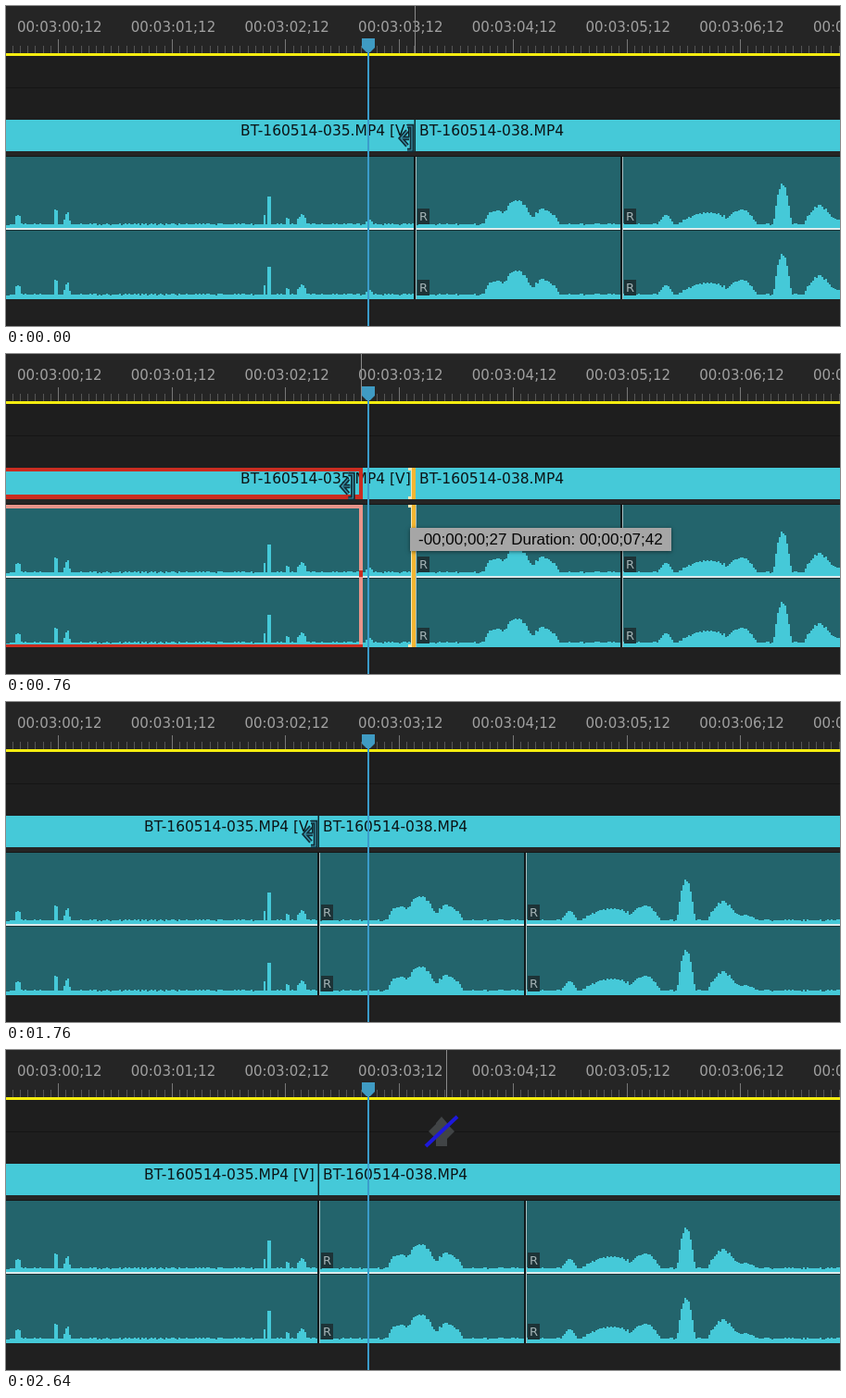
Write an HTML page with a canvas that moves like this. It is 900x346 px and loops after 2.68 s.

```html
<!DOCTYPE html>
<html lang="en">
<head>
<meta charset="utf-8">
<title>Trimming a clip on a timeline</title>
<style>
  html, body { margin: 0; width: 100%; height: 100%; overflow: hidden; background: #222; }
  canvas { display: block; width: 900px; height: 346px; }
</style>
</head>
<body>
<canvas id="stage" width="900" height="346"></canvas>
<script>
const ctx = document.getElementById('stage').getContext('2d');
const LOOP = 2680, STEP = 40, PRESS = 240, RELEASE = 1600, LEAVE = 1800;
const CUT = 441, CUT_END = 337, CLIP_LENGTH = 223;
const FRAME_WIDTH = 2.04, FULL_DURATION = 489;
const CYAN = '#45c9d8', TEAL = '#23646c', RED = '#cb2c20', SALMON = '#e8948a';
const YELLOW = '#f2b632', PALE = '#f7e6b4', GREY = '#484b4d';
const UI_FONT = '"DejaVu Sans", sans-serif';

// [time, position] of the pointer
const pointerX = [[300, 441], [440, 430], [475, 423], [520, 415], [960, 346], [1080, 337],
  [LEAVE, 337], [2040, 413], [2120, 429], [2440, 492], [2640, 470]];
const pointerY = [[LEAVE, 143], [2120, 144], [2440, 95], [2640, 88]];

// [centre, half width, height] of the sounds in each clip
const sounds = [
  [[12, 3, 14], [53, 2, 20], [65, 3, 16], [278, 1, 13], [283, 1, 44], [303, 2, 10], [318, 6, 13], [391, 4, 9]],
  [[87, 14, 18], [109, 19, 28], [139, 17, 19]],
  [[47, 9, 12], [92, 34, 15], [128, 18, 19], [173, 9, 46], [213, 17, 22], [232, 22, 9]]
];

function track(keys, x) {
  if (x <= keys[0][0]) return keys[0][1];
  for (let i = 1; i < keys.length; i++) {
    const [a, from] = keys[i - 1], [b, to] = keys[i];
    if (x <= b) return from + (to - from) * (x - a) / (b - a);
  }
  return keys[keys.length - 1][1];
}

function noise(n) {
  const v = Math.sin(n * 12.9898) * 43758.5453;
  return v - Math.floor(v);
}

function box(color, x, y, w, h) {
  ctx.fillStyle = color;
  ctx.fillRect(x, y, w, h);
}

function label(text, x, y, color, font) {
  ctx.fillStyle = color;
  ctx.font = font;
  ctx.fillText(text, x, y);
}

function stroke(path, color, width) {
  ctx.strokeStyle = color;
  ctx.lineWidth = width;
  ctx.stroke(new Path2D(path));
}

function fill(path, color) {
  ctx.fillStyle = color;
  ctx.fill(new Path2D(path));
}

function drawRuler(lineX) {
  box('#252525', 0, 0, 900, 51);
  const period = 122.7;
  for (let i = -15; i < 120; i++) {
    const major = i % 15 === 0;
    box(major ? '#777' : '#555', Math.round(56 + i * period / 15), major ? 36 : 43, 1, major ? 15 : 8);
  }
  for (let i = 0; i < 8; i++) label(`00:03:0${i};12`, 12 + i * period, 28, '#a0a0a0', `15px ${UI_FONT}`);
  if (lineX) box('#8a8a8a', lineX, 0, 1, 51);
  box('#f4ec10', 0, 51, 900, 3);
}

function drawWave(clip, start, end, base) {
  for (let d = 0; start + d < Math.min(end, 900); d += 2) {
    const level = sounds[clip].reduce((peak, [centre, half, height]) =>
      Math.max(peak, height * (1 - ((d - centre) / (half + 1)) ** 2)), 3);
    const jitter = (noise(d + clip * 977) - 0.4) * (level > 8 ? 3 : 1.6);
    const h = Math.round(level + jitter) + 2;
    box(CYAN, start + d, base - h, Math.min(2, end - start - d), h);
  }
}

function drawTracks(cut) {
  box('#1e1e1e', 0, 54, 900, 69);
  box('#151515', 0, 88, 900, 1);
  box('#252525', 0, 157, 900, 6);
  box('#151515', 0, 162, 900, 1);
  box(CYAN, 0, 123, 900, 34);
  label('BT-160514-035.MP4 [V]', cut - 188, 140, '#0b1416', `15.5px ${UI_FONT}`);
  label('BT-160514-038.MP4', cut + 5, 140, '#0b1416', `15.5px ${UI_FONT}`);
  box('#10282c', cut - 0.5, 123, 1.5, 34);

  const third = cut + CLIP_LENGTH;
  for (const [top, base] of [[163, 241], [243, 317]]) {
    box(TEAL, 0, top, 900, base - top);
    drawWave(0, 0, cut, base);
    drawWave(1, cut, third, base);
    drawWave(2, third, 900, base);
  }
  box('#dcebec', 0, 240, 900, 2);
  box('#1a3033', 0, 242, 900, 1);
  for (const x of [cut, third]) {
    box('#10191b', x - 1, 163, 2, 154);
    box('#a9bfc1', x + 1, 163, 1, 154);
    for (const y of [219, 296]) {
      box('#1d3337', x + 3, y, 13, 17);
      label('R', x + 5, y + 13, '#a5b4b6', `13px ${UI_FONT}`);
    }
  }
  box('#202020', 0, 317, 900, 29);
}

function drawSelection(edge) {
  const right = edge + 1;
  box(RED, 0, 123, right, 4);
  box(RED, 0, 152, right, 5);
  box(RED, right - 4, 123, 4, 34);
  box(SALMON, 0, 163, right, 4);
  box(SALMON, right - 4, 163, 4, 152);
  box(RED, right - 4, 234, 4, 7);
  box(RED, 0, 314, right, 3);

  for (const [y, h] of [[123, 34], [163, 154]]) {
    box(YELLOW, 438, y, 4, h);
    box(PALE, 437, y, 1, h);
    box(PALE, 434, y, 4, 3);
    box(PALE, 434, y + h - 3, 4, 3);
  }
}

function drawPlayhead() {
  box('#3a9ccb', 390, 48, 2, 298);
  fill('M384 35h14v10l-5 5h-4l-5-5z', '#3f9bc3');
}

function timecode(frames) {
  const two = n => String(n).padStart(2, '0');
  return `00;00;${two(Math.floor(frames / 60))};${two(frames % 60)}`;
}

function drawTooltip(offset) {
  ctx.save();
  ctx.shadowColor = 'rgba(0,0,0,.5)';
  ctx.shadowBlur = 4;
  ctx.shadowOffsetY = 1;
  box('#a6a6a6', 436, 188, 282, 25);
  ctx.restore();
  // The minus sign and duration follow the dragged edge.
  label(`-${timecode(offset)} Duration: ${timecode(FULL_DURATION - offset)}`, 445, 206, '#050505',
    '17px "Liberation Sans", Arial, sans-serif');
}

function drawTrimCursor() {
  const shape = 'M-8-13h5v26h-5M-8-8l-7 8 7 8M-14 0h8';
  stroke(shape, '#122c36', 4.6);
  stroke(shape, '#3995ab', 1.2);
}

function drawBlockedCursor() {
  ctx.globalAlpha = 0.85;
  fill('M0-16l6 7v25h-12v-25zM-14 0l8-8h12l8 8-8 8h-12z', GREY);
  ctx.globalAlpha = 1;
  stroke('M-17 16L17-16', '#1d18dc', 4);
}

function draw(now) {
  const t = Math.floor(now % LOOP / STEP) * STEP;
  const dragging = t >= PRESS && t < RELEASE;
  const x = track(pointerX, t);
  const edge = Math.round(track(pointerX, t - 45));

  drawRuler(t < RELEASE || t > LEAVE + STEP ? edge - (dragging ? 1 : 0) : 0);
  drawTracks(t < RELEASE ? CUT : CUT_END);
  if (dragging) drawSelection(edge);
  drawPlayhead();
  const offset = Math.round((CUT - track(pointerX, t - 60)) / FRAME_WIDTH);
  if (dragging && offset > 0) drawTooltip(offset);

  ctx.save();
  ctx.translate(x, track(pointerY, t));
  if (t > LEAVE && x > CUT_END + 8) drawBlockedCursor();
  else drawTrimCursor();
  ctx.restore();
}

const start = performance.now();
function tick() {
  draw(performance.now() - start);
  requestAnimationFrame(tick);
}
tick();
</script>
</body>
</html>
```
